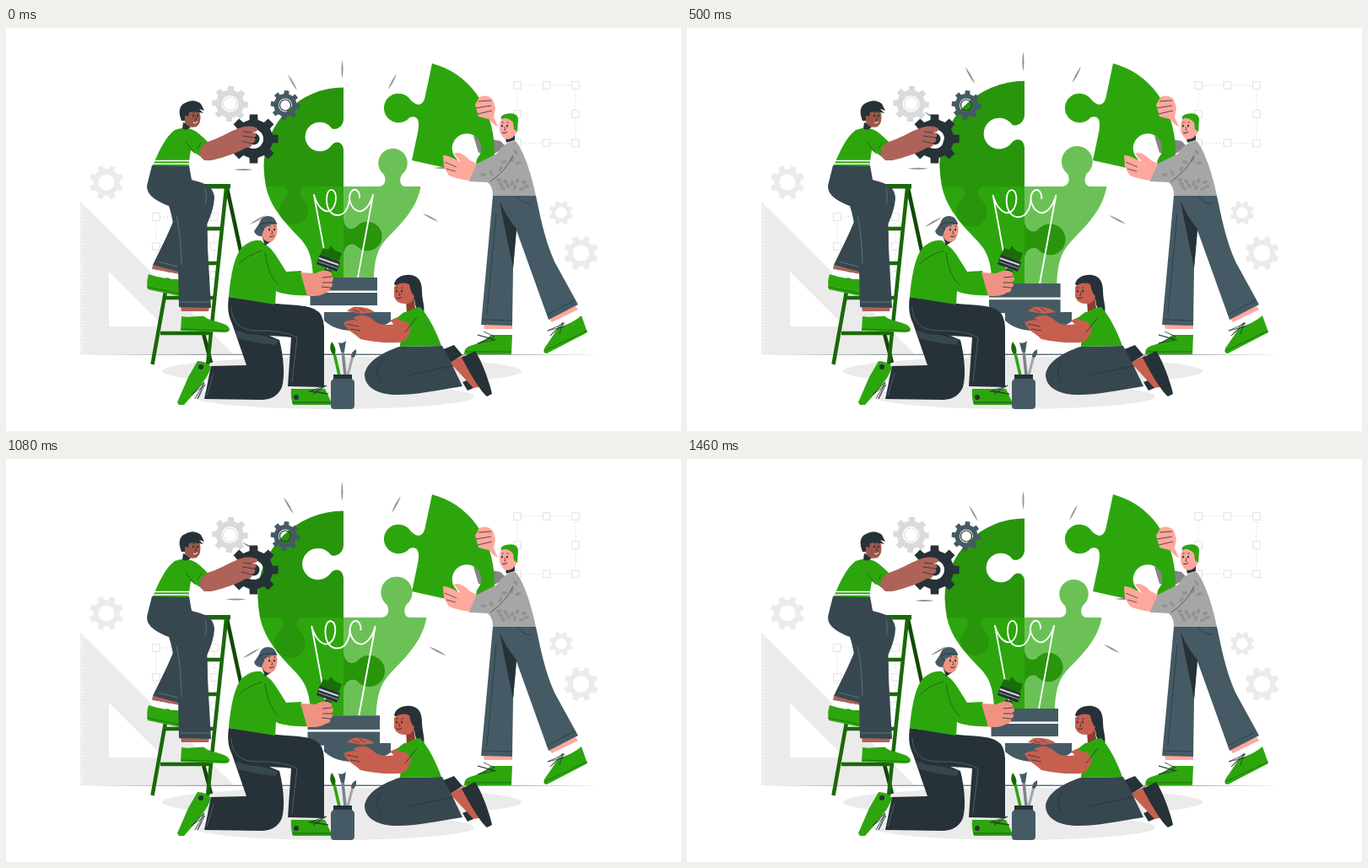
Animation of 800 by 478 pixels, one loop 1.5 s. Source, as an HTML page with a canvas:

```html
<!DOCTYPE html>
<html lang="en">
<head>
<meta charset="utf-8">
<style>
html, body { margin: 0; width: 100%; height: 100%; overflow: hidden; background: #fff; }
canvas { display: block; width: 800px; height: 478px; }
</style>
</head>
<body>
<canvas width="800" height="478"></canvas>
<script>
const ctx = document.querySelector('canvas').getContext('2d');
const GREEN = '#2da60e', DEEP = '#28950d', PALE = '#6cc156', LADDER = '#1a6808';
const INK = '#263238', SLATE = '#37474f', STEEL = '#455a64', MIST = '#ebebeb';
const BROWN = '#ad6359', CORAL = '#ef9282', RUST = '#c75f4f', PINK = '#ffa89d';
const LOOP = 1500, FRAME = 1000 / 24;
// Linear pulse: [ms, scale]
const PULSE = [[0, 1], [300, 1.1], [859, 1.002], [1156, 1.1], [1458, 1], [1500, 1]];

const fill = (d, color, rule = 'nonzero') => {
  ctx.fillStyle = color;
  ctx.fill(new Path2D(d), rule);
};
const line = (d, color = INK, width = 0.8) => {
  ctx.strokeStyle = color;
  ctx.lineWidth = width;
  ctx.stroke(new Path2D(d));
};
const oval = (x, y, rx, ry, color, turn = 0) => {
  ctx.fillStyle = color;
  ctx.beginPath();
  ctx.ellipse(x, y, rx, ry, turn, 0, 7);
  ctx.fill();
};

function gear(x, y, r, hole, color, turn = 0) {
  ctx.beginPath();
  for (let i = 0; i < 8; i++) {
    const a = turn + i * Math.PI / 4;
    for (const [off, k] of [[-0.22, 0.78], [-0.16, 1], [0.16, 1], [0.22, 0.78]])
      ctx.lineTo(x + Math.sin(a + off) * r * k, y - Math.cos(a + off) * r * k);
  }
  ctx.closePath();
  ctx.moveTo(x + hole, y);
  ctx.arc(x, y, hole, 0, 7);
  ctx.fillStyle = color;
  ctx.fill('evenodd');
}

function selection(xs, ys) {
  const [l, , r] = xs, [t, , b] = ys;
  ctx.setLineDash([2, 2]);
  line(`M${l} ${t}H${r}V${b}H${l}Z`, '#dedede', 0.9);
  ctx.setLineDash([]);
  for (const x of xs) for (const y of ys) {
    if (x === xs[1] && y === ys[1]) continue;
    ctx.fillStyle = '#fff';
    ctx.fillRect(x - 4.5, y - 4.5, 9, 9);
    line(`M${x - 4.3} ${y - 4.3}h8.6v8.6h-8.6z`, '#dedede', 0.9);
  }
}

function backdrop() {
  oval(398, 407, 213, 17, MIST);
  oval(388, 437, 167, 15, MIST);
  selection([178, 213, 247], [224, 259, 293]);
  selection([606, 640.5, 675], [68, 102, 136.5]);
  fill('M88 206V387H270ZM122 289V354H187Z', MIST, 'evenodd');
  for (let i = 0; i < 44; i++) line(`M88 ${212 + i * 4}h${i % 5 ? 4 : 7}`, '#fff', 0.7);
  gear(119, 183, 20.5, 9.5, MIST, 0.39);
  gear(658, 219, 14.5, 6.8, MIST, 0.39);
  gear(681.5, 267, 20.5, 9.8, MIST, 0.39);
  fill('M85 387.3L400 386.6L706 387.3L400 388Z', '#59636a');
}

function ray(x1, y1, x2, y2) {
  const mx = (x1 + x2) / 2, my = (y1 + y2) / 2, n = Math.hypot(x2 - x1, y2 - y1) / 2;
  const dx = (y2 - y1) / n, dy = (x1 - x2) / n;
  fill(`M${x1} ${y1}Q${mx + dx} ${my + dy} ${x2} ${y2}Q${mx - dx} ${my - dy} ${x1} ${y1}`, '#929292');
}

function bulb(scale) {
  ctx.save();
  ctx.translate(400, 188);
  ctx.scale(scale, scale);
  ctx.translate(-400, -188);
  [[398.5, 38, 398.5, 60], [334, 55, 345, 74], [463, 54, 453, 73], [288, 105, 305, 114],
   [270, 168, 293, 168], [507, 166, 529, 166], [289, 233, 308, 222], [494, 220, 513, 230]]
    .forEach(r => ray(...r));
  fill('M400 70.5A94.5 94.5 0 0 0 305.5 165Q306 177 308 188H400V144C399 135 391 133 386 139A17.3 17.3 0 1 1 386 119C391 122 400 117 400 108Z', DEEP);
  fill('M308 188C314 215 333 233 348 249C358 260 363 270 364 296H400V188Z', GREEN);
  fill('M329 188C337 194 333 199 329 204A17 17 0 1 0 353 204C349 198 345 194 353 188Z', DEEP);
  fill('M400 188H438C450 189 451 181 448 174A17.3 17.3 0 1 1 469 174C465 182 468 189 475 188H491.5C487 215 467 233 452 249C442 260 437 270 436 296H400Z', PALE);
  fill('M400 227C401 237 409 241 415 236A17.3 17.3 0 1 1 415 258C408 254 401 259 400 268Z', DEEP);
  line('M383 296L365 198C369 212 377 219 383 217C389 215 391 207 391 201C391 189 380 188 380 203C380 216 386 222 393 222C402 222 407 212 407 201M417 296L435 198C431 212 423 219 417 217C411 215 407 208 407 201C408 188 420 189 419 202', '#fff', 1.8);
  ctx.fillStyle = STEEL;
  ctx.fillRect(360.5, 296, 79.5, 15.5);
  ctx.fillRect(360.5, 314, 79.5, 15);
  ctx.restore();
  fill('M377 337H456V348C446 356 427 359 412 359C393 359 384 353 377 347Z', STEEL);
}

function face(x, y, gap, smile = INK) {
  oval(x, y, 1, 1.5, INK);
  oval(x + gap, y, 1, 1.5, INK);
  line(`M${x - 1} ${y - 4}h3M${x + gap - 1} ${y - 4}h3M${x + gap / 2} ${y + 1}l1 4h-2`, INK, 0.7);
  line(`M${x} ${y + 8}q${gap / 2} 2 ${gap} -1`, smile, 1);
}

function ladder() {
  line('M262 190L284 292M232 355L243 397', '#104a03', 4.5);
  line('M211 190L173.5 399M261 190L239 399', LADDER, 4.5);
  line('M232 238H257M230 279H252M187 320H246M183 362H242', LADDER, 4.5);
  fill('M206 185H266V190.5H206Z', LADDER);
}

function climber() {
  // rear leg and shoe
  fill('M174 281L206 288L205 292L173 286Z', BROWN);
  fill('M173 286L205 292L205 299L172 293Z', '#fff');
  fill('M169 292Q187 298 205 298L206 318L168 310Q166 301 169 292Z', GREEN);
  line('M167 307L206 315', '#17600a', 0.7);
  fill('M216 166L219 180C232 183 246 186 247 201C246 225 229 250 208 290L174 281C185 258 197 236 203 215Z', SLATE);
  line('M236 190Q241 205 229 226M180 277L207 284', '#6d7b83');
  // front leg
  fill('M207 331H241L240 336H208Z', BROWN);
  fill('M208 342C218 344 227 341 235 342C242 349 262 348 265 357Q265 361 258 361L207 359Z', GREEN);
  line('M207 357L264 359', '#17600a', 0.7);
  fill('M173 163H217L220 180C229 188 234 198 236 211C239 230 239 245 239 260L243 332L205 331L204 285C202 255 199 229 193 211C174 204 164 195 168 183Z', SLATE);
  line('M206 325H242M208 280Q207 243 202 222', '#6d7b83');
  // gears
  gear(265.5, 90, 21.5, 10, '#dadada', 0.05);
  line('M257.5 90a8 8 0 1 0 16 0a8 8 0 1 0 -16 0', '#dadada', 1);
  gear(331, 91.5, 17.5, 8, STEEL, 0.1);
  line('M324.5 91.5a6.5 6.5 0 1 0 13 0a6.5 6.5 0 1 0 -13 0', INK, 1.2);
  gear(293.5, 131.5, 29.5, 11.5, INK);
  oval(293.5, 131.5, 7, 7, INK);
  // torso, arm, head
  fill('M174 163C181 147 188 130 200 121Q212 116 222 121C228 124 233 129 239 135L230 152L219 145L216 164Z', GREEN);
  line('M176 157.5H217M175 161H216', '#fff', 1.4);
  line('M213 135L224 149M227 143L231 136', '#17600a');
  fill('M231 141L239 135C253 131 262 124 271 121C280 116 291 115 298 119Q299 123 292 124Q300 126 294 130Q298 134 291 137Q293 142 284 142C276 147 261 153 243 157H235L229 151Z', BROWN);
  line('M291 124L281 123M294 130L280 128M291 137L279 134', INK);
  fill('M210 112L209 119Q213 122 217 119L220 116Z', INK);
  fill('M211 102C217 97 226 97 230 101Q232 112 226 117Q217 120 212 112Z', '#9c5648');
  fill('M208 110C204 100 205 92 212 89Q222 83 231 90L235 98L229 96L234 101Q222 98 217 100L216 105L212 104V110Z', INK);
  face(222, 104, 5, '#fff');
}

function kneeler() {
  // rear leg and shoe
  fill('M227 395Q237 395 243 402C239 416 226 430 211 447H205L203 444L216 414Z', GREEN);
  line('M234 421l-14 14l16 -12l-9 17l8 -20l-11 20', INK);
  oval(231, 402, 3, 3, INK);
  fill('M266 345L324 370C329 390 331 412 327 426Q321 440 304 441L235 440L243 401L285 400Z', INK);
  fill('M271 359Q300 363 322 370L320 376Q292 373 275 368Z', SLATE);
  line('M246 409L238 436', '#5a6870');
  // front leg
  fill('M338 428H378L386 445V447H340Q337 438 338 428Z', GREEN);
  line('M339 444H386M362 430l20 4l-23 -3l21 -7l-16 10l14 -10', INK);
  oval(344, 438, 3, 3, INK);
  fill('M264 319L321 327C344 329 360 329 368 335Q376 339 377 355L377 426L334 425L338 367C323 365 305 365 286 363C262 356 262 333 264 319Z', INK);
  line('M267 331Q268 358 296 359Q328 358 345 367L339 420', '#5a6870');
  // brush
  fill('M376 261L382 263L385 258L390 264L398 267L394 278L371 271Z', '#1b6d0b');
  fill('M372 269L396 278L392 289L368 280Z', INK);
  line('M371 273L394 281', '#d5d5d5', 2.2);
  line('M370 277L393 285', '#a5a5a5', 1);
  fill('M378 285L386 288L381 299L374 296Z', INK);
  // torso, hand, head
  fill('M264 319C266 297 270 269 281 259Q292 250 302 252L314 262C321 270 326 280 332 289L350 288L358 317C342 318 325 315 320 312L319 328Z', GREEN);
  line('M276 280Q286 269 304 264M307 266Q310 293 323 305', '#17600a');
  fill('M349 290L367 291Q375 286 381 288Q387 289 386 294Q390 298 386 301Q389 306 384 308Q386 313 379 314Q373 318 364 318H357Z', CORAL);
  line('M386 295L375 296M387 302L375 302M384 308L374 307', INK);
  fill('M303 246L307 258L316 252Z', INK);
  fill('M301 240Q310 228 320 232Q324 241 318 251Q311 257 305 250Z', CORAL);
  fill('M300 232Q302 223 311 223Q319 223 321 233Q312 232 306 238L303 247Q296 247 294 241Z', STEEL);
  line('M301 233Q311 229 321 232M300 233L306 240', INK);
  face(312, 239, 6);
}

function brushCup() {
  line('M389 386L395 412', GREEN, 3.5);
  line('M399 383L402 412', '#78858c', 3.5);
  line('M411 389L405 412', '#a5a5a5', 3);
  fill('M387 387Q382 380 386 372Q392 380 390 386Z', LADDER);
  fill('M397 384L394 373Q399 375 403 371L401 384Z', STEEL);
  fill('M409 390Q409 384 415 381Q416 387 412 391Z', STEEL);
  fill('M388 411H410V417H388Z', INK);
  fill('M389 416H409Q413 417 413 421V448Q413 452 408 452H389Q385 452 385 448V421Q385 417 389 416Z', STEEL);
}

function sitter() {
  // legs
  fill('M516 382L531 376L541 388L527 397Z', INK);
  fill('M541 420L551 416L554 427L547 430Z', INK);
  fill('M526 397L543 388L566 425L554 427Z', RUST);
  fill('M540 391L556 383C564 395 573 420 576 434L570 437C562 431 549 408 540 391Z', INK);
  fill('M466 378L517 377L527 396L541 425C510 430 480 436 460 435C440 434 425 426 425 411C427 397 443 386 466 378Z', SLATE);
  line('M530 401Q498 407 477 412M445 420Q434 406 445 396', INK);
  // hair, head, torso
  fill('M460 304C462 295 471 292 480 293Q493 295 493 312C493 324 498 333 494 341Q485 336 484 322L470 310Z', INK);
  fill('M404 336Q412 329 418 331Q430 331 437 337L422 339Z', RUST);
  line('M411 334l8 3M419 332l6 4', INK, 0.6);
  fill('M455 347L466 342L476 350L467 358Z', RUST);
  fill('M474 323L483 318L485 332L475 338Z', '#8d3c31');
  fill('M460 307Q468 300 479 304L484 318Q481 328 474 327Q464 328 460 319Z', RUST);
  fill('M460 305Q468 298 478 304Q480 315 484 318L487 307L477 296Z', INK);
  face(463, 312, 6);
  fill('M472 337Q476 337 484 332L491 331C501 342 510 360 516 377L467 378C467 368 473 358 475 350L463 345Q467 340 472 337Z', GREEN);
  fill('M400 349Q411 344 418 348L411 344Q423 337 434 345Q440 352 450 352Q463 352 473 347L480 355Q477 372 466 373Q440 374 420 369C413 362 404 359 400 349Z', RUST);
  line('M404 351L418 354M408 357L420 359M487 343L473 361', INK);
}

function puzzlePiece() {
  fill('M505 42C547 53 578 92 579 145Q579 158 577 169L561 172C557 165 556 159 559 154A17.3 17.3 0 1 0 534 155C538 160 534 168 526 167L481 157L488 124C491 110 488 103 478.5 106A17.3 17.3 0 1 1 480 86C488 94 495 92 497 80Z', GREEN);
}

function farArm() {
  fill('M554 128L586 134L593 141L579 149L560 148Z', '#858585');
}

function lifter() {
  // feet
  fill('M566 352H600V357H567Z', PINK);
  fill('M643 344L675 330L678 334L647 349Z', PINK);
  fill('M575 364H600L599 387H543Q543 379 550 377Q565 373 575 364Z', GREEN);
  fill('M655 355Q672 350 682 341L689 361L641 386Q636 386 638 380Z', GREEN);
  line('M544 384H599M638 383L689 359', '#17600a', 0.7);
  line('M581 370l-22 -6l20 6l-20 4l20 -8l-13 -6M662 354l-20 5l20 -9l-17 15l15 -16l-4 14', INK);
  // legs
  fill('M584 199H628C633 222 638 250 650 277L678 328L643 346L605 240Z', STEEL);
  fill('M577 199H588L605 240L601 285L600 353L563 352Z', STEEL);
  fill('M585 205Q592 223 605 238L601 284Q592 243 585 205Z', INK);
  line('M565 346L600 347M641 340L674 323M606 199Q612 209 622 208M570 340L581 220', '#263c45');
  // far hand
  fill('M558 98L556 91L561 82Q570 78 577 85L580 95L578 106L583 117L579 115L572 108L560 105Z', PINK);
  line('M560 87l15 -1M557 95l18 -3M559 102l17 -4', INK);
  // torso
  fill('M577 199Q577 188 571 183L549 182L550 165L582 149C587 140 596 134 604 134C613 145 622 170 628 199Z', '#a6a6a6');
  for (let i = 0; i < 11; i++) oval(584 + (i * 11) % 36, 180 + (i * 7) % 13, 3.2, 2, '#929292', i);
  [[566, 174], [575, 172], [586, 167], [590, 159], [604, 147], [600, 156], [607, 160]]
    .forEach(([x, y], i) => oval(x, y, 3.5, 1.8, '#929292', i));
  line('M601 151Q593 169 574 182', '#4a4a4a');
  // near hand
  fill('M518 151Q523 150 539 159L531 149Q538 145 550 157L558 161L549 181Q535 179 525 175L519 165Z', PINK);
  line('M520 159l14 6M522 167l11 3', INK, 0.7);
  // head
  fill('M591 126L603 122L603 133L593 136Z', INK);
  fill('M587 107Q595 101 605 108L606 122Q602 132 593 132Q584 128 585 116Z', PINK);
  fill('M587 108Q585 104 592 102Q606 99 607 108L606 123L602 120L601 112Q594 105 587 108Z', GREEN);
  face(588, 116, 6);
}

function pulseAt(ms) {
  const i = PULSE.findIndex(([t]) => t > ms);
  const [t0, a] = PULSE[i - 1], [t1, b] = PULSE[i];
  return a + (b - a) * (ms - t0) / (t1 - t0);
}

function draw(now) {
  // The motion advances at 24 steps a second on a 10 ms clock.
  const step = Math.min(35, Math.floor((now % LOOP + 4) / FRAME));
  ctx.fillStyle = '#fff';
  ctx.fillRect(0, 0, 800, 478);
  backdrop();
  bulb(pulseAt(step * FRAME));
  ladder();
  climber();
  farArm();
  puzzlePiece();
  lifter();
  kneeler();
  sitter();
  brushCup();
}

const start = performance.now();
function tick() {
  draw(performance.now() - start);
  requestAnimationFrame(tick);
}
ctx.lineJoin = 'round';
tick();
</script>
</body>
</html>
```
